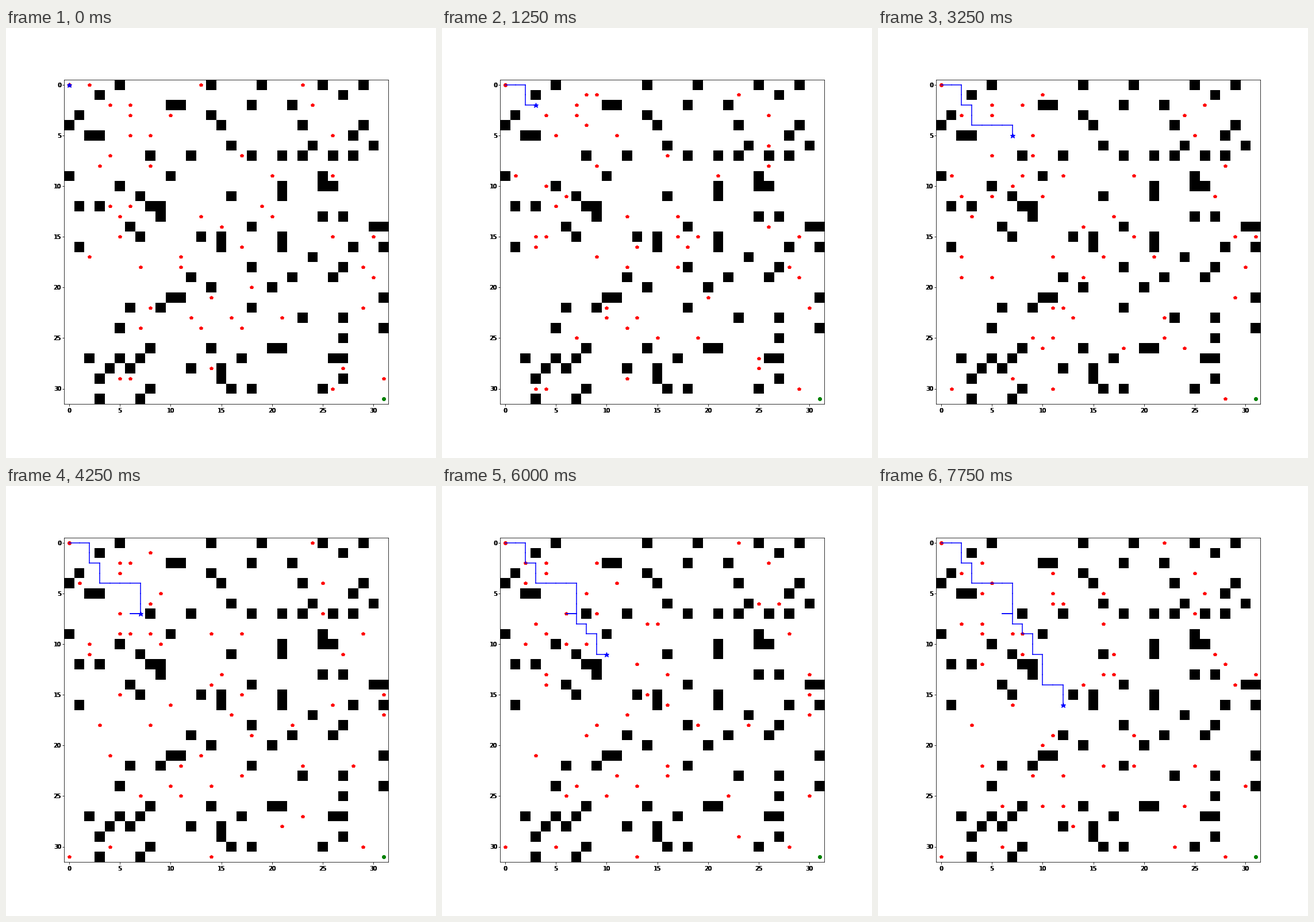
Recreate the animation shown at these times as a matplotlib script. Size 748 by 748 pixels, loop 8000 ms.

```python
import random

import matplotlib.pyplot as plt
import numpy as np
from matplotlib.animation import FuncAnimation

SIZE, DPI = 748, 68
PT = 72 / DPI  # points per pixel
N, FRAMES, INTERVAL = 32, 32, 250
LEFT, TOP, SIDE = 101.4, 90, 564
CELL = SIDE / N
WALKERS = 50

# The fixed map: columns of the blocked cells, row by row
WALLS = [
    [5, 14, 19, 25, 29], [3, 27], [10, 11, 18, 22], [1, 14],
    [0, 15, 23, 29], [2, 3, 28], [16, 24, 30], [8, 12, 18, 21, 23, 26, 28],
    [], [0, 10, 25], [5, 21, 25, 26], [7, 16, 21],
    [1, 3, 8, 9], [9, 25, 27], [6, 18, 30, 31], [7, 13, 15, 21],
    [1, 15, 21, 28, 31], [24], [18, 27], [12, 22, 26],
    [14, 20], [10, 11, 31], [6, 9, 18], [23, 27],
    [5, 31], [27], [8, 14, 20, 21], [2, 5, 7, 17, 26, 27],
    [4, 6, 12, 15], [3, 15, 27], [8, 16, 18, 25], [3, 7],
]

MOVES = "RRDDRDDRRRRWDDDLRDRDRDDRDDDRRDD"
STEP = {"R": (1, 0), "L": (-1, 0), "D": (0, 1), "U": (0, -1), "W": (0, 0)}
START, GOAL = (0, 0), (N - 1, N - 1)


def shift(cell, move):
    dx, dy = STEP[move]
    return cell[0] + dx, cell[1] + dy


def agent_path():
    path = [START]
    for move in MOVES:
        path.append(shift(path[-1], move))
    return path


def random_walks(grid, path):
    """Every walker moves to a free neighbouring cell on each step."""
    rng = random.Random(12)
    free = [(c, r) for r in range(N) for c in range(N)
            if not grid[r, c] and (c, r) != GOAL]
    cells = rng.sample([cell for cell in free if cell != START], WALKERS)
    free = set(free)
    history = [list(cells)]
    for agent in path[1:]:
        for i, cell in enumerate(cells):
            options = [shift(cell, m) for m in "RLDU"]
            options = [o for o in options
                       if o in free and o not in cells and o != agent]
            if options:
                cells[i] = rng.choice(options)
        history.append(list(cells))
    return history


def label(x, base, text, ha):
    # Stacked, slightly offset copies give the heavy look of the labels
    for dx in (-0.5, 0.5, -0.5, 0.5):
        fig.text((x + dx) / SIZE, 1 - base / SIZE, text, ha=ha, va="baseline",
                 fontsize=10 * PT, family="DejaVu Sans")


def marker(style, size, cells=()):
    xs, ys = zip(*cells) if cells else ((), ())
    return ax.plot(xs, ys, style, ms=size * PT, mew=PT)[0]


grid = np.zeros((N, N))
for row, cols in enumerate(WALLS):
    grid[row, cols] = 1

path = agent_path()
walks = random_walks(grid, path)

plt.rcParams["axes.linewidth"] = 0.8 * PT
fig = plt.figure(figsize=(SIZE / DPI, SIZE / DPI), dpi=DPI, facecolor="white")
ax = fig.add_axes([LEFT / SIZE, 1 - (TOP + SIDE) / SIZE,
                   SIDE / SIZE, SIDE / SIZE])
ax.imshow(grid, cmap="gray_r", interpolation="nearest")

ticks = range(0, N, 5)
ax.set_xticks(ticks)
ax.set_yticks(ticks)
ax.tick_params(length=3.5 * PT, width=0.8 * PT,
               labelbottom=False, labelleft=False)
for t in ticks:
    mid = (t + 0.5) * CELL
    label(LEFT + mid, 668.6, str(t), "center")
    label(95.8, TOP + mid + 3.9, str(t), "right")

marker("ro", 6, [START])
marker("go", 6, [GOAL])
dots = marker("rp", 6)
trail = [ax.plot(*zip(a, b), "b-", lw=1.5 * PT)[0]
         for a, b in zip(path, path[1:])]
star = marker("b*", 9)
ax.set_xlim(-0.5, N - 0.5)
ax.set_ylim(N - 0.5, -0.5)


def draw(frame):
    dots.set_data(*zip(*walks[frame]))
    for i, segment in enumerate(trail):
        segment.set_visible(i < frame)
    x, y = path[frame]
    star.set_data([x], [y])
    return [dots, star, *trail]


anim = FuncAnimation(fig, draw, frames=FRAMES, interval=INTERVAL,
                     repeat=True, repeat_delay=0)
plt.show()
```
